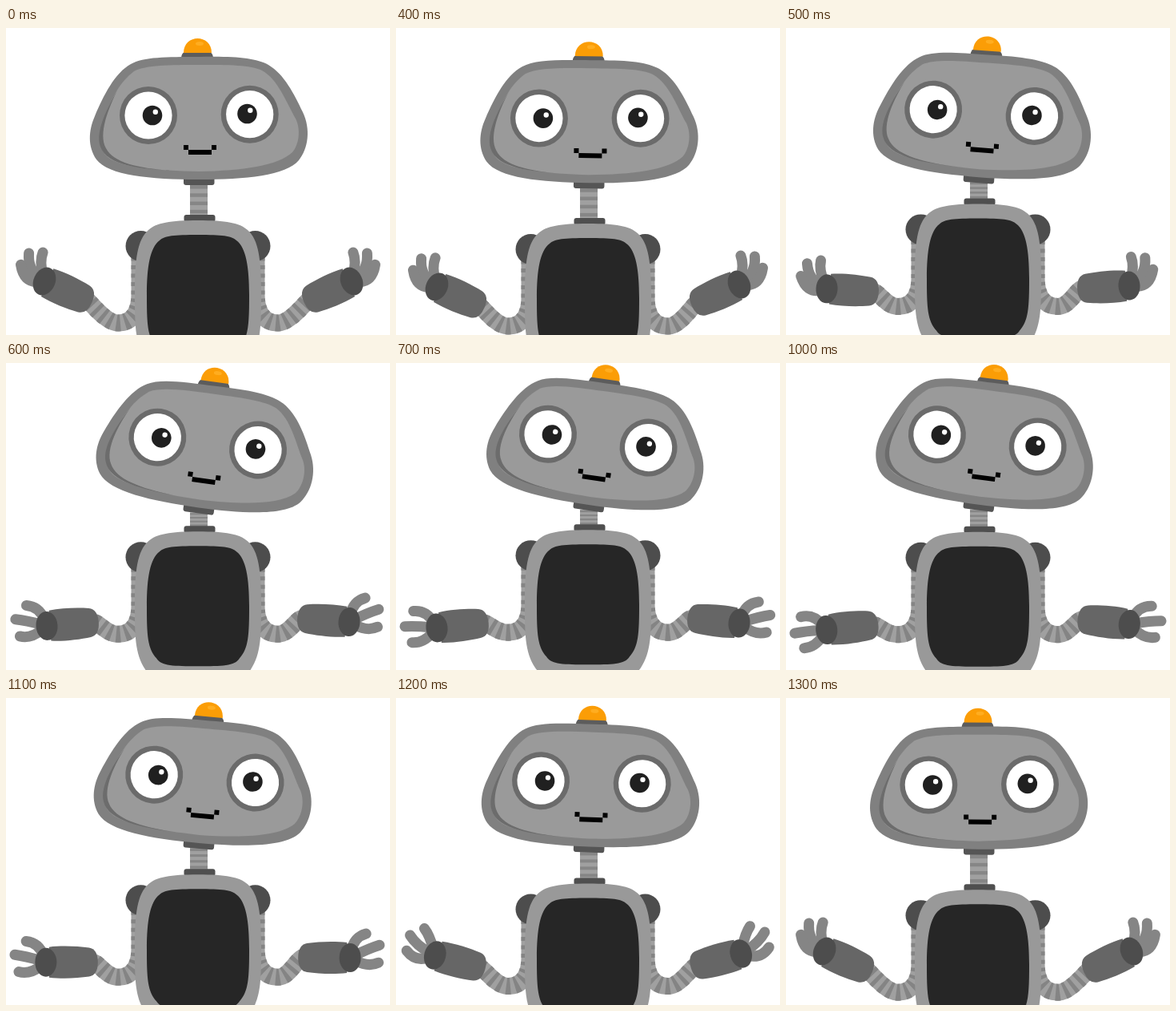
These frames come from a looping animation (480 by 383 pixels, 1400 ms). An HTML page with a canvas:

```html
<!DOCTYPE html>
<html lang="en">
<head>
<meta charset="utf-8">
<title>Shrugging robot</title>
<style>
  html, body { margin: 0; width: 100%; height: 100%; overflow: hidden; background: #fff; }
  canvas { display: block; width: 100%; height: 100%; }
</style>
</head>
<body>
<canvas id="stage" width="480" height="383"></canvas>
<script>
const ctx = document.getElementById('stage').getContext('2d');
const LOOP = 1400, STEP = 100;

// Body and screen are right halves, drawn twice; the forearm starts at the wrist
const SHAPES = {
  head: 'M241 36C285 35 312 37 328 46C348 58 360 82 371 105C381 126 378 150 366 165C350 184 300 189 241 189C180 189 128 184 113 164C102 148 103 128 111 110C122 84 136 56 156 45C172 36 200 36 241 36Z',
  face: 'M241 46C280 46 305 46 320 53C340 64 350 92 362 113C369 127 366 146 358 155C340 172 295 178 241 179C190 178 140 174 126 160C114 148 116 128 124 110C134 84 142 68 160 54C175 46 205 46 241 46Z',
  shade: 'M140 76C128 98 111 128 118 148C126 172 170 176 208 178C165 175 134 168 125 150C115 132 128 100 140 76Z',
  lamp: 'M222 31C222 7 257 7 257 31Z',
  lampBase: 'M223 30H255Q259 32 259 38H219Q219 32 223 30Z',
  body: 'M0 0C35 0 52 3 62 12C76 24 79 50 79 90C79 130 79 152 66 172C58 185 30 186 0 186Z',
  screen: 'M0 18C30 18 42 19 48 25C60 34 64 58 64 93C64 130 63 146 52 158C46 168 30 168 0 168Z',
  forearm: 'M4 -19C20 -21 40 -20 54 -18Q65 -16 65 0Q65 16 54 18C40 20 20 21 4 19Z'
};
for (const name in SHAPES) SHAPES[name] = new Path2D(SHAPES[name]);

const radians = degrees => degrees * Math.PI / 180;
const clamp = v => Math.min(1, Math.max(0, v));
const mix = (a, b, t) => a + (b - a) * t;

function smooth(time, start, length) {
  const u = clamp((time - start) / length);
  return u * u * (3 - 2 * u);
}

function poseAt(time) {
  // Ease out from 400 to 800 ms; a drop above 1 starts with a dip
  const rise = (drop, power) =>
    time < 400 ? 0 : 1 - drop * (1 - clamp((time - 400) / 400)) ** power;
  const fall = 1 - smooth(time, 925, 415);
  const armFall = 1 - smooth(time, 1020, 280);
  return {
    top: 240 - 32 * rise(1.125, 4) * fall,
    headY: -12.5 * rise(1.34, 1.8) * fall,
    tilt: 8.2 * smooth(time, 350, 290) * fall,
    arm: rise(1, 4) * armFall,
    dip: rise(0.6, 1) * armFall,
    shift: rise(0, 1) * fall,
    open: smooth(time, 500, 100) - smooth(time, 1100, 200),
    settle: smooth(time, 600, 200) - smooth(time, 1000, 100)
  };
}

function shape(name, color) {
  ctx.fillStyle = color;
  ctx.fill(SHAPES[name]);
}

function ellipse(x, y, rx, color, ry = rx) {
  ctx.fillStyle = color;
  ctx.beginPath();
  ctx.ellipse(x, y, rx, ry, 0, 0, 2 * Math.PI);
  ctx.fill();
}

function box(x, y, w, h, color, r = 0) {
  ctx.fillStyle = color;
  ctx.beginPath();
  ctx.roundRect(x, y, w, h, r);
  ctx.fill();
}

function group(draw) {
  ctx.save();
  draw();
  ctx.restore();
}

// Draws the left side, then its mirror image
function bothSides(draw) {
  for (const side of [-1, 1]) {
    group(() => {
      ctx.translate(240, 0);
      ctx.scale(-side, 1);
      ctx.translate(-240, 0);
      draw(side);
    });
  }
}

function drawTube(top, x, y, angle) {
  const a = radians(angle), bend = radians(angle + 20);
  const ex = x + 60 * Math.cos(a), ey = y + 60 * Math.sin(a);
  const bottom = top + 128;
  const tube = new Path2D();
  tube.moveTo(167, top + 35);
  tube.lineTo(167, top + 92);
  tube.bezierCurveTo(167, top + 115, 157, bottom, 140, bottom);
  tube.bezierCurveTo(126, bottom, ex + 8 * Math.cos(bend), ey + 8 * Math.sin(bend), ex, ey);
  ctx.lineWidth = 21;
  ctx.strokeStyle = '#a0a0a0';
  ctx.stroke(tube);
  ctx.strokeStyle = '#848484';
  ctx.setLineDash([5, 5.5]);
  ctx.stroke(tube);
  ctx.setLineDash([]);
}

function drawFingers(open) {
  const around = (degrees, r) => [-r * Math.cos(radians(degrees)), -r * Math.sin(radians(degrees))];
  ctx.lineWidth = 13;
  ctx.lineCap = 'round';
  ctx.strokeStyle = '#858585';
  for (let i = 0; i < 3; i++) {
    const tip = mix(87 - 26 * i, 43 - 33 * i, open);
    const bend = mix(76 - 40 * i, 67 - 54 * i, open);
    ctx.beginPath();
    ctx.moveTo(...around(tip, 40 - 4 * (i - 1) ** 2));
    ctx.quadraticCurveTo(...around(bend, 26), ...around(bend, 8));
    ctx.stroke();
  }
}

function drawArm({ top, arm, dip, shift, open, settle }, side) {
  const x = 48 + 3 * shift;
  const y = 316 + (13.5 - 3.5 * side) * dip;
  const angle = mix(24, -6, arm);
  drawTube(top, x, y, angle);
  ellipse(168.5, top + 32, 19, '#4d4d4d');
  ctx.translate(x, y);
  group(() => {
    ctx.rotate(radians(arm * (6 * side - 7) + 14 * open - 17 * settle));
    drawFingers(open);
  });
  ctx.rotate(radians(angle));
  shape('forearm', '#666');
  ellipse(0, 0, 13.5, '#4d4d4d', 18);
}

function drawNeck(top, headY) {
  const start = 194 + headY, length = top - 5 - start;
  box(230, start, 22, length, '#a0a0a0');
  for (let i = 0; i < 4; i++) {
    box(230, start + length * (i + 0.2) / 4, 22, length * 0.11, '#868686');
  }
  box(222.5, top - 7, 39, 9, '#4f4f4f', 3);
}

function drawEye(x, y, px, py) {
  ellipse(x, y, 36, '#6b6b6b');
  ellipse(x, y, 29.6, '#fff');
  ellipse(px, py, 12.3, '#202020');
  ellipse(px + 3.8, py - 4.2, 3.2, '#fff');
}

function drawHead(headY, tilt) {
  ctx.translate(242 + 1.4 * tilt, 108 + headY);
  ctx.rotate(radians(tilt));
  ctx.translate(-242, -108);
  box(222, 186, 38.5, 10, '#555', 3);
  shape('lampBase', '#5c5c5c');
  shape('lamp', '#fb9d06');
  ellipse(242, 19.5, 5, '#ffad20', 2.5);
  shape('head', '#808080');
  shape('face', '#9a9a9a');
  shape('shade', '#6c6c6c');
  drawEye(178, 109, 183, 109);
  drawEye(304.7, 107.7, 301.5, 107);
  box(222, 146, 6, 6, '#000');
  box(257, 146, 6, 6, '#000');
  box(228, 152, 29, 6, '#000');
}

function draw(time) {
  const pose = poseAt(Math.floor(time % LOOP / STEP) * STEP);
  ctx.fillStyle = '#fff';
  ctx.fillRect(0, 0, 480, 383);
  bothSides(side => drawArm(pose, side));
  drawNeck(pose.top, pose.headY);
  bothSides(() => {
    ctx.translate(240, pose.top);
    shape('body', '#999');
    shape('screen', '#262626');
  });
  group(() => drawHead(pose.headY, pose.tilt));
}

const begin = performance.now();
function tick() {
  draw(performance.now() - begin);
  requestAnimationFrame(tick);
}
tick();
</script>
</body>
</html>
```
